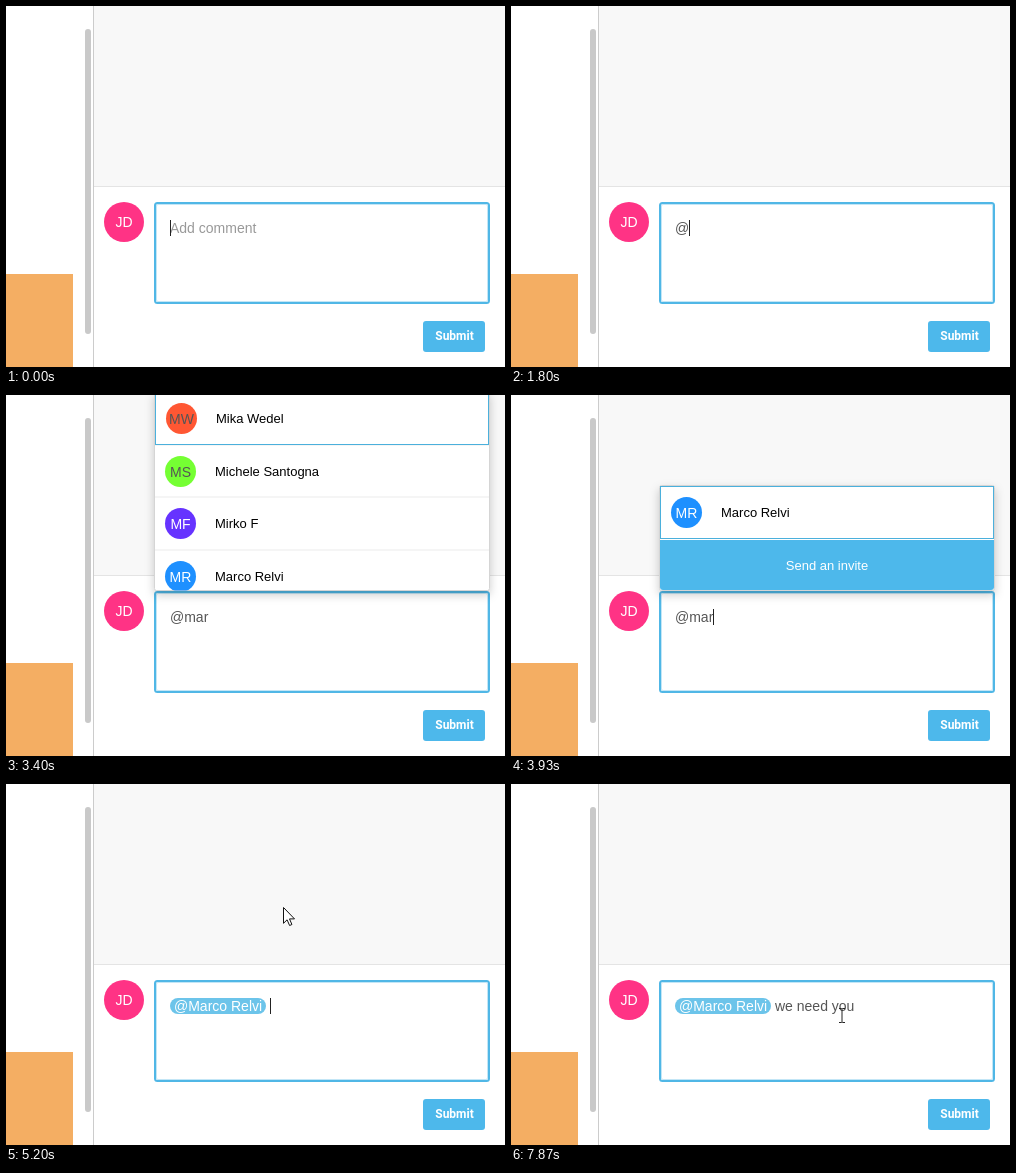
Write an HTML page that moves like this. It is 499 px wide and 361 px high and loops after 8000 ms.

```html
<!DOCTYPE html>
<html lang="en">
<head>
<meta charset="utf-8">
<title>Mention in a comment</title>
<style>
html, body { margin: 0; width: 100%; height: 100%; overflow: hidden; background: #fff; }
svg { display: block; width: 499px; height: 361px; }
text { font: 14px "Liberation Sans", Arial, sans-serif; }
.mid { text-anchor: middle; }
.item { font-size: 13px; }
.button { font: 700 12px Roboto, sans-serif; }
.menu { filter: drop-shadow(0 4px 5px rgba(0, 0, 0, .2)); }
</style>
</head>
<body>
<svg viewBox="0 0 499 361">
  <defs>
    <clipPath id="menuClip"><rect x="148" y="0" width="336" height="195.5"/></clipPath>
  </defs>
  <rect width="499" height="361" fill="#fff"/>
  <rect x="88" width="411" height="180" fill="#f8f8f8"/>
  <rect x="88" y="180" width="411" height="1" fill="#e4e4e4"/>
  <rect x="87" width="1" height="361" fill="#ccc"/>
  <rect x="79" y="23" width="6" height="305" rx="3" fill="#c9c9c9"/>
  <rect y="268" width="67" height="93" fill="#f4ae63"/>
  <circle cx="118" cy="216" r="20" fill="#ff3385"/>
  <text class="mid" x="118" y="221" fill="#fff">JD</text>
  <rect x="149" y="197" width="334" height="100" rx="2.5" fill="#fff" stroke="#50b7e6" stroke-width="2"/>
  <rect x="150.5" y="198.5" width="331" height="97" rx="1.5" fill="none" stroke="#c3e6f6"/>
  <rect x="417" y="315" width="62" height="31" rx="3" fill="#4db8eb"/>
  <text class="mid button" x="448.5" y="334" fill="#fff">Submit</text>
  <g id="field"></g>
  <g id="menu"></g>
  <g id="pointer"></g>
</svg>
<script>
const LOOP = 8000, PICKED = 5130;
const LEFT = 164, AFTER_PILL = 264;

const people = {
  MW: ['Mika Wedel', '#ff5733', '#555'],
  MS: ['Michele Santogna', '#75ff33', '#555'],
  RL: ['Raniero Lovischetta', '#e9e9e9', '#555'],
  MF: ['Mirko F', '#6633ff', '#fff'],
  MR: ['Marco Relvi', '#1e90ff', '#fff']
};

// [time, value] lists; each value holds until the next time
const typed = [
  [0, ''], [1670, '@'], [2400, '@m'], [2670, '@ma'], [3270, '@mar'], [PICKED, ''],
  [6130, 'w'], [6270, 'we'], [6530, 'we '], [6670, 'we n'], [6800, 'we ne'],
  [6930, 'we nee'], [7130, 'we need'], [7400, 'we need '], [7600, 'we need y'],
  [7670, 'we need yo'], [7800, 'we need you']
];
const caretOn = [
  [0, 1], [130, 0], [670, 1], [1200, 0], [1670, 1], [2330, 0], [2400, 1], [3400, 0],
  [3930, 1], [4470, 0], [PICKED, 1], [5730, 0], [6130, 1], [7870, 0]
];
const menus = [
  [0, ''], [1870, 'MW MS RL MF'], [2870, 'MW MS MF MR'], [3600, 'MR'], [PICKED, '']
];
const path = [
  [4440, 291, 258], [4730, 275, 159], [5080, 277, 123], [5340, 277, 123], [5730, 331, 231]
];

const shapes = {
  arrow: `<path d="M.5.5v15.8l3.6-3.5 2.5 5.7 2.3-1-2.4-5.6h5z" fill="#fff" stroke="#111"/>`,
  hand: `<path transform="translate(-6)" d="M6.5.5C7.6.5 8 1.3 8 2v6c0-1 3-1 3 .5.4-1 3-.7 3 .7.4-.9
    2.5-.6 2.5 1V16l-2 4v2.5h-8v-2L1 14.5C-.5 12 1.5 10.5 3 12l2 2V2C5 1.3 5.4.5 6.5.5z"
    fill="#fff" stroke="#111"/><path d="M2 8v4M5 9v3M8 10v3" stroke="#111"/>`,
  beam: `<path d="M-3-6.5h2.5l.5.5.5-.5H3M0-6V7M-3 7.5h2.5L0 7l.5.5H3" fill="none" stroke="#222"/>`
};

const pen = document.createElement('canvas').getContext('2d');
pen.font = '14px "Liberation Sans", Arial, sans-serif';

const at = (list, t) => list.findLast(([start]) => start <= t)[1];
const label = (x, y, text, fill, cls = '') =>
  `<text class="${cls}" x="${x}" y="${y}" fill="${fill}">${text}</text>`;

function field(t) {
  const text = at(typed, t), picked = t >= PICKED;
  const x = picked ? AFTER_PILL : LEFT;
  let out = '';
  if (picked) {
    out += `<rect x="164" y="214" width="96" height="16" rx="8" fill="#6cc4ea"/>` +
      label(168, 227, '@' + people.MR[0], '#fff');
  }
  out += text || picked ? label(x, 227, text, '#555') : label(x, 227, 'Add comment', '#999');
  if (at(caretOn, t)) {
    const cx = Math.floor(x + pen.measureText(text).width);
    out += `<rect x="${cx}" y="214" width="1" height="16" fill="#222"/>`;
  }
  return out;
}

function person(id, y, selected) {
  const [name, color, ink] = people[id], dx = selected ? 1 : 0;
  return `<circle cx="${174.5 + dx}" cy="${y}" r="15.5" fill="${color}"/>` +
    label(174.5 + dx, y + 5, id, ink, 'mid') + label(209 + dx, y + 4.5, name, '#000', 'item');
}

function menu(t, pointerY) {
  const ids = at(menus, t);
  if (!ids) return '';
  const list = ids.split(' '), invite = list.length === 1;
  const top = invite ? 91 : -3, first = invite ? 117.5 : 23.5;
  let rows = '';
  list.forEach((id, i) => {
    const y = first + Math.round(i * 52.6);
    if (i) rows += `<rect x="149" y="${y - 27}" width="334" height="1" fill="#ececec"/>`;
    rows += person(id, y, !i);
  });
  rows += `<rect x="149.5" y="${top + .5}" width="333" height="52" fill="none" stroke="#4bb0dc"/>`;
  if (invite) {
    const hover = pointerY > 144 && pointerY < 196;
    rows += `<path d="M149 145h334v47q0 3-3 3H152q-3 0-3-3z" fill="${hover ? '#74c5eb' : '#4db8eb'}"/>` +
      label(316, 175, 'Send an invite', '#fff', 'mid item');
  }
  return `<g class="menu"><rect x="148.5" y="${top - .5}" width="335" height="${196 - top}" rx="2"
    fill="#fff" stroke="#d5d5d5"/><g clip-path="url(#menuClip)">${rows}</g></g>`;
}

function pointerAt(t) {
  if (t < 4470) return null;
  const i = path.findLastIndex(p => p[0] <= t);
  const [t0, x0, y0] = path[i], [t1, x1, y1] = path[i + 1] || [LOOP, x0, y0];
  const u = (t - t0) / (t1 - t0), k = u * u * (3 - 2 * u);
  return { x: Math.round(x0 + (x1 - x0) * k), y: Math.round(y0 + (y1 - y0) * k) };
}

function pointer(t, p) {
  if (!p) return '';
  const kind = p.y > 195 ? 'beam' : t < 5200 ? 'hand' : 'arrow';
  return `<g transform="translate(${p.x} ${p.y})">${shapes[kind]}</g>`;
}

const shown = {};
function put(id, markup) {
  if (shown[id] === markup) return;
  shown[id] = markup;
  document.getElementById(id).innerHTML = markup;
}

function draw(t) {
  const p = pointerAt(t);
  put('field', field(t));
  put('menu', menu(t, p ? p.y : 0));
  put('pointer', pointer(t, p));
}

const start = performance.now();
function tick() {
  draw((performance.now() - start) % LOOP);
  requestAnimationFrame(tick);
}
tick();
</script>
</body>
</html>
```
